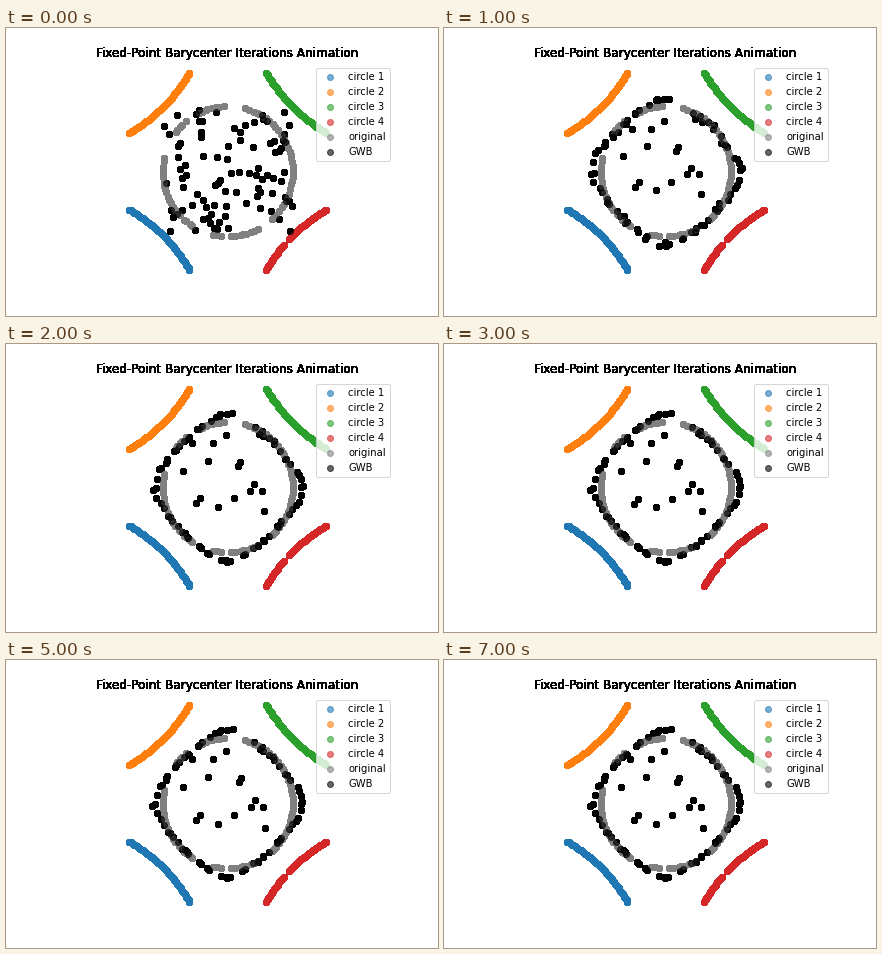
These frames come from a looping animation (432 by 288 pixels, 8 s). A matplotlib script:

```python
import numpy as np
import matplotlib.pyplot as plt
from matplotlib.animation import FuncAnimation

W, H, DPI = 432, 288, 72
FRAMES, STEP = 16, 500
PASSES = 20   # see-through layers stacked until they look solid
DECAY = 0.55  # remaining distance after each iteration
MID = np.array([221.8, 143.2])
TITLE = "Fixed-Point Barycenter Iterations Animation"

# Stray points that settle inside the ring, in pixels
INNER = np.array([
    (186, 99), (207, 99), (220, 91), (177, 127), (202, 117), (233, 122),
    (235, 118), (249, 140), (245, 147), (257, 147), (228, 155), (212, 164),
    (194, 155), (190, 160), (259, 168)]) - 0.4

rng = np.random.default_rng(12)


def polar(center, radius, angle):
    return center + np.column_stack([radius * np.cos(angle),
                                     -radius * np.sin(angle)])


def corner_arc(sx, sy, gap=None):
    """Arc in one corner, bulging towards the middle of the stage."""
    t = np.linspace(-1, 1, 60)
    if gap is not None:
        t = t[abs(t - gap) > 0.065]
    hub = MID + 183.4 * np.array([sx, sy])
    return polar(hub, 168, np.arctan2(sy, -sx) + t * np.radians(14.66))


def base_circle():
    """Points on the plain circle, with a few gaps."""
    spans = [(93, 119), (130, 146), (168, 240), (257, 264), (273, 299),
             (312, 437)]
    deg = np.concatenate([np.arange(a, b + 1, 3.5) for a, b in spans])
    return polar(MID, 65, np.radians(deg + rng.normal(0, 0.8, deg.size)))


def final_ring(n=76):
    """Circle with four soft peaks: top, left, bottom and right."""
    deg = np.linspace(84, 427, n) + rng.normal(0, 3, n)
    a = np.radians(deg)
    radius = 63.5 + 10.5 * np.cos(2 * a) ** 4 + rng.normal(0, 0.8, n)
    return polar(MID, radius, a)


circle = base_circle()
ring = final_ring()
start = rng.uniform((158, 80), (287, 204), (len(ring) + len(INNER), 2))
goal = np.vstack([ring, INNER])
offset = np.vstack([rng.normal(0, 2.8, ring.shape), 0.1 * (MID - INNER)])


def cloud(i):
    return start if i == 0 else goal + offset * DECAY ** (i - 1)


fig = plt.figure(figsize=(W / DPI, H / DPI), dpi=DPI, facecolor="white")
ax = fig.add_axes([0.125, 0.11, 0.775, 0.77])
ax.set_xlim(54, 388.8)
ax.set_ylim(256.32, 34.56)
ax.axis("off")

layers = [
    ("circle 1", "tab:blue", corner_arc(-1, 1)),
    ("circle 2", "tab:orange", corner_arc(-1, -1)),
    ("circle 3", "tab:green", corner_arc(1, -1)),
    ("circle 4", "tab:red", corner_arc(1, 1, gap=0.2)),
    ("original", "gray", circle),
    ("GWB", "black", start),
]
moving = []
for k in range(PASSES):
    for name, color, points in layers:
        dots = ax.scatter(*points.T, color=color, alpha=0.6,
                          label=name if k == 0 else None)
    moving.append(dots)  # the cloud is the last layer
    ax.text(221.4, 28.56, TITLE, size=12, ha="center", va="baseline")
ax.legend(loc="upper right", fontsize=10)


def draw(i):
    for dots in moving:
        dots.set_offsets(cloud(i))
    return moving


anim = FuncAnimation(fig, draw, frames=FRAMES, interval=STEP, repeat=True,
                     repeat_delay=0, init_func=lambda: draw(0), blit=False)
plt.show()
```
